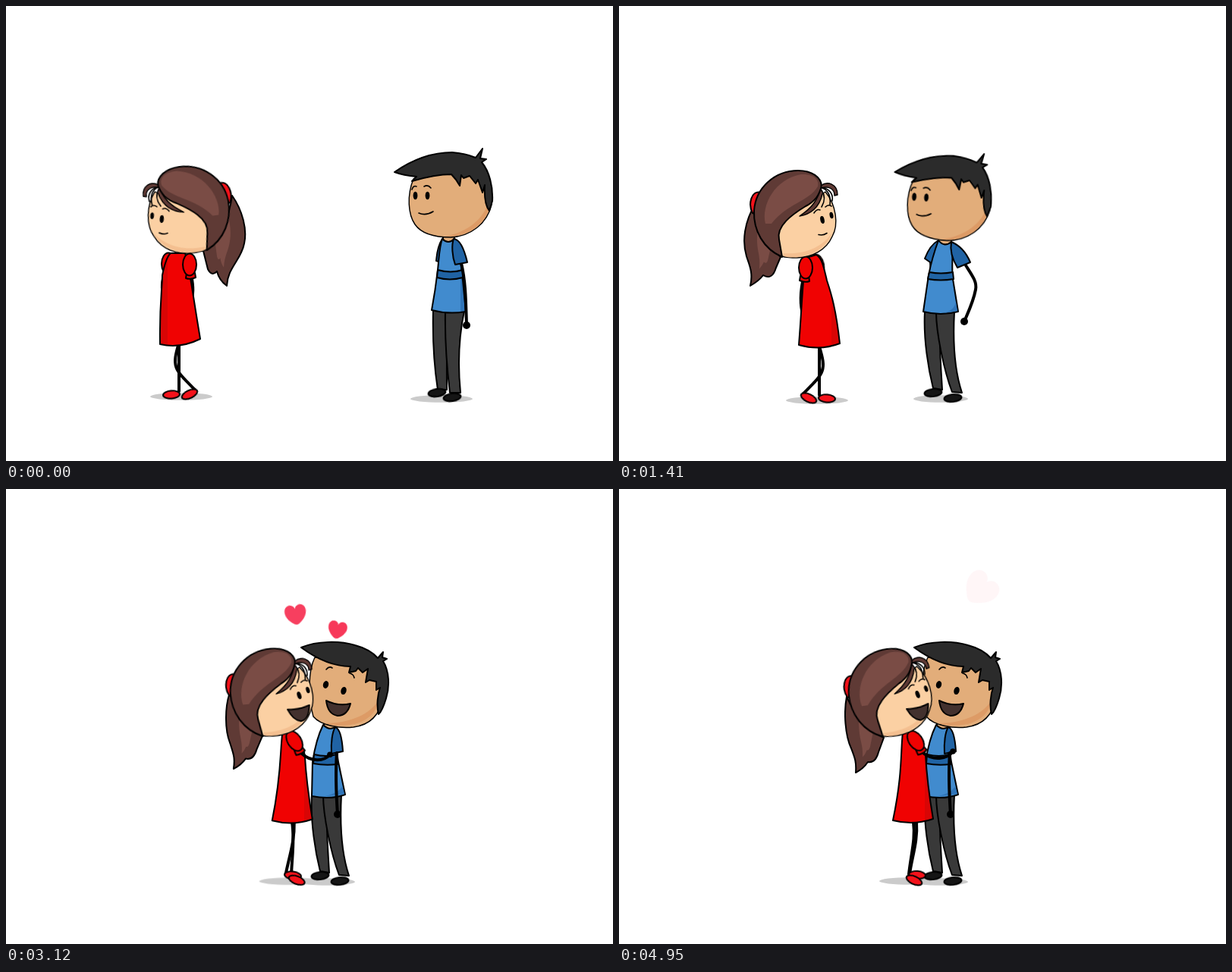
Animation, 800 px wide and 600 px high, one loop 5.31 s. Source, as an HTML page without scripts:

```html
<!DOCTYPE html>
<html lang="en">
<head>
<meta charset="utf-8">
<title>A rose</title>
<style>
html,body{margin:0;width:100%;height:100%;overflow:hidden;background:#fff}
svg{display:block;width:800px;height:600px}
svg *{animation:5.31s linear infinite}
svg .cut{animation-timing-function:step-end}
.ink{stroke:#000;stroke-width:2;stroke-linejoin:round;stroke-linecap:round}
.thin{stroke-width:1.4}
.line{fill:none;stroke:#000;stroke-width:1.6;stroke-linecap:round}
.limb{fill:none;stroke:#000;stroke-width:4;stroke-linecap:round}
.hand{marker-end:url(#hand)}
.small{marker-end:url(#smallHand)}
.shadow{fill:#cbcbcb}
.pants{fill:#393939}
.blue{fill:#418bce}
.navy{fill:#2063a4}
.tan{fill:#e2ad7a}
.hair{fill:#2b2b2b}
.brown{fill:#5f3a35}
.glow{fill:#7a4c45}
.red{fill:#f4121a}
.mouth{fill:#43312e}

/* scene cuts */
.early{animation-name:early}
.mid{animation-name:mid}
.late{animation-name:late}
.single{animation-name:single}
.calmBoy{animation-name:calmBoy}
.gladBoy{animation-name:gladBoy}
.calmGirl{animation-name:calmGirl}
.gladGirl{animation-name:gladGirl}
.back{animation-name:back}
.front{animation-name:front}
@keyframes early{0%{visibility:visible}21%{visibility:hidden}}
@keyframes mid{0%{visibility:hidden}21%{visibility:visible}55.9%{visibility:hidden}}
@keyframes late{0%{visibility:hidden}55.9%{visibility:visible}}
@keyframes single{0%{visibility:visible}55.9%{visibility:hidden}}
@keyframes calmBoy{0%{opacity:1}31%{opacity:0}}
@keyframes gladBoy{0%{opacity:0}31%{opacity:1}}
@keyframes calmGirl{0%{opacity:1}38.9%{opacity:0}}
@keyframes gladGirl{0%{opacity:0}38.9%{opacity:1}}
@keyframes back{0%{visibility:visible}36.7%{visibility:hidden}}
@keyframes front{0%{visibility:hidden}36.7%{visibility:visible}}

/* him */
.walk{animation-name:walk}
@keyframes walk{
0%,4.6%{transform:translateX(0)}
7.91%{transform:translateX(-35px)}
17.51%{transform:translateX(-136px)}
20.34%,100%{transform:translateX(-150px)}}
.bob{animation-name:bob}
@keyframes bob{
0%,4.6%,20.34%,100%{transform:translateY(0)}
7.91%,14.31%{transform:translateY(10px)}
11.3%{transform:translateY(4px)}
17.51%{transform:translateY(9px)}}
.nod{transform-origin:586px 250px;animation-name:nod}
@keyframes nod{
0%,4.6%{transform:translate(0,0) rotate(0)}
7.91%,14.31%{transform:translate(0,10px) rotate(0)}
11.3%{transform:translate(0,4px) rotate(0)}
17.51%{transform:translate(-4px,9.4px) rotate(-2deg)}
20.34%{transform:translate(0,3px) rotate(0)}
24.5%,30.5%,35%,52.5%{transform:translate(-.5px,4.4px) rotate(3.5deg)}
32%{transform:translate(-.5px,-6px) rotate(3.5deg)}
55.9%,100%{transform:translate(18px,8px) rotate(12deg)}}
.blink,.wink{transform-box:fill-box;transform-origin:center}
.blink{animation-name:blink}
@keyframes blink{0%,7.1%,8.9%,100%{transform:scaleY(1)}7.7%,8.2%{transform:scaleY(.22)}}
.wink{animation-name:wink}
@keyframes wink{0%,74%,77%,100%{transform:scaleY(1)}75.2%,75.8%{transform:scaleY(.2)}}
.legL{animation-name:legL}
@keyframes legL{
0%,4.6%{d:path("M563 400C562 440 565 480 569 506L581 506C581 470 580 440 584 402")}
7.91%,14.31%{d:path("M566 410C540 450 543 470 541 509L553 510C554 470 565 445 587 412")}
11.3%,17.51%{d:path("M565 410C536 455 551 465 576 503L588 494C568 470 568 455 586 412")}
20.34%,100%{d:path("M553 403C551 440 558 480 564 504L576 506C574 470 571 440 575 404")}}
.legR{animation-name:legR}
@keyframes legR{
0%,4.6%{d:path("M579 402C578 450 582 485 585 510L599 510C596 480 596 440 604 402")}
7.91%,14.31%{d:path("M581 412C582 475 588 475 615 506L629 504C595 470 593 460 604 412")}
11.3%,17.51%{d:path("M577 412C556 455 564 465 573 508L587 507C564 450 603 445 603 410")}
20.34%,100%{d:path("M568 404C568 430 578 480 589 509L602 510C592 480 590 440 592 403")}}
.footL{animation-name:footL}
@keyframes footL{
0%,4.6%{transform:translate(568px,510px) rotate(-8deg)}
7.91%,14.31%{transform:translate(540px,512px) rotate(4deg)}
11.3%,17.51%{transform:translate(581px,503px) rotate(-48deg)}
20.34%,100%{transform:translate(564px,510px) rotate(-6deg)}}
.footR{animation-name:footR}
@keyframes footR{
0%,4.6%{transform:translate(588px,516px) rotate(-8deg)}
7.91%,14.31%{transform:translate(620px,515px) rotate(-20deg)}
11.3%,17.51%{transform:translate(576px,517px) rotate(-5deg)}
20.34%,100%{transform:translate(590px,517px) rotate(-6deg)}}
.stride{animation-name:stride}
@keyframes stride{0%,4.6%,11.3%,17.51%{rx:41px}7.91%,14.31%{rx:53px}20.34%,100%{rx:36px}}
.swing{animation-name:swing}
@keyframes swing{
0%,4.6%{d:path("M600 339C606 365 606 390 607 421")}
7.91%{d:path("M600 335C597 375 591 395 581 419")}
14.31%{d:path("M600 337C606 365 614 390 626 415")}
17.51%,100%{d:path("M603 339C611 366 611 391 611 420")}}
.offer{animation-name:offer}
@keyframes offer{
0%,21%{d:path("M411 338C405 360 404 385 408 415")}
26.4%,30%{d:path("M411 338C412 365 420 385 436 385")}
35%{d:path("M411 338C402 360 399 370 367 377")}
40%,100%{d:path("M411 338C403 372 402 367 347 365")}}
.rose{animation-name:rose}
@keyframes rose{
0%,30%{transform:translate(428px,372px) rotate(-20deg)}
35%{transform:translate(359px,361px) rotate(-18deg)}
40%,100%{transform:translate(348px,348px) rotate(0)}}

/* her */
.turn{animation-name:turn}
@keyframes turn{0%{transform:translate(492px,-5px) scale(-1,1)}9.42%{transform:none}}
.tilt{transform-origin:232px 275px;animation-name:tilt}
@keyframes tilt{
0%,9.41%{transform:translate(20px,-1px) rotate(8deg)}
9.42%{transform:translate(10px,-2px) rotate(4deg)}
13%,36.7%{transform:translate(0,0) rotate(0)}
42.4%,51.5%{transform:translate(47px,-9px) rotate(19deg)}
59.5%,100%{transform:translate(125px,-6px) rotate(-8deg)}}
.tail{animation-name:tail}
.core{transform-box:fill-box;transform-origin:55% 40%;transform:scale(.36,.66)}
@keyframes tail{
0%,9.41%{d:path("M194 255C180 275 174 300 178 318C182 340 200 350 201 374Q211 367 214 355Q221 362 226 352L232 328Q200 300 194 255")}
9.42%,10.2%,21%,36.7%{d:path("M180 260C165 285 162 310 168 330C172 342 177 352 173 369Q185 362 190 355Q202 362 207 345L213 331Q185 305 180 260")}
14.1%{d:path("M174 245C140 235 112 245 104 265C98 285 110 300 103 318Q115 318 120 312Q138 318 146 308L178 286Q171 268 174 245")}
17.51%{d:path("M174 249C145 245 122 262 118 285C114 308 126 320 115 344Q127 339 133 334Q148 340 153 327L177 285Q171 268 174 249")}
42.4%,51.5%{d:path("M241 221C212 222 190 240 187 265C185 288 194 300 178 319Q188 314 194 311Q208 318 215 304L232 290Q226 255 241 221")}
59.5%,100%{d:path("M300 274C296 295 298 325 306 342C311 355 313 360 312 374Q322 369 328 360Q338 362 342 347L349 328Q318 312 300 274")}}
.dress{animation-name:dress}
@keyframes dress{
0%,9.41%{d:path("M256 331C250 350 246 385 236 444Q262 457 289 451C290 400 286 375 286 360C283 345 280 335 275 331Z")}
9.42%,36.7%{d:path("M250 331C242 345 243 370 237 447Q265 455 291 445C286 400 280 380 274 362C270 345 268 333 260 328Z")}
42.4%,51.5%{d:path("M268 322C260 345 258 370 248 440Q275 449 301 440C297 400 294 380 291 355C290 340 290 330 286 324Z")}
59.5%,100%{d:path("M374 321C371 345 374 375 361 437Q388 444 414 435C408 400 405 370 404 350C400 338 395 325 386 318Z")}}
.puff{animation-name:puff}
@keyframes puff{
0%,9.41%{transform:translate(250px,346px) rotate(0)}
9.42%,36.7%{transform:translate(246px,345px) rotate(0)}
42.4%,51.5%{transform:translate(271px,335px) rotate(-6deg)}
59.5%,100%{transform:translate(391px,332px) rotate(-35deg)}}
.farPuff{animation-name:farPuff}
@keyframes farPuff{
0%,9.41%{transform:translate(278px,345px) rotate(0)}
9.42%,36.7%{transform:translate(261px,342px) rotate(-10deg)}
42.4%,51.5%{transform:translate(290px,337px) rotate(-8deg)}
59.5%,100%{transform:translate(388px,335px) rotate(-35deg)}}
.rest{animation-name:rest}
@keyframes rest{
0%,9.41%{d:path("M247 365C245 378 244 390 254 402")}
9.42%,24%{d:path("M243 363C237 380 239 400 252 414")}
30%,100%{d:path("M241 362C240 385 238 400 236 418")}}
.reach{animation-name:reach}
@keyframes reach{
0%,36.7%{d:path("M241 362C240 385 238 400 236 418")}
42.4%,51.5%{d:path("M273 352C275 375 284 388 296 393")}
59.5%,100%{d:path("M402 349C414 358 432 357 440 346")}}
.far{animation-name:far}
@keyframes far{
0%,9.41%{d:path("M283 358C287 370 289 382 278 400")}
9.42%,36.7%{d:path("M264 352C266 370 262 390 262 400")}
42.4%,51.5%{d:path("M297 352C300 366 306 371 316 373")}
59.5%,100%{d:path("M390 345C392 352 392 356 390 360")}}
.legA{animation-name:legA}
@keyframes legA{
0%,36.7%{d:path("M264 449C264 470 264 490 264 513")}
42.4%,51.5%{d:path("M275 444C270 470 266 490 264 513")}
55%{d:path("M316 442C310 470 304 490 294 508")}
59.5%,100%{d:path("M392 439C394 465 386 485 383 508")}}
.legB{animation-name:legB}
@keyframes legB{
0%,36.7%{d:path("M264 449C274 482 270 484 243 511")}
42.4%,51.5%{d:path("M288 443C306 464 300 470 272 491")}
55%{d:path("M320 442C326 465 336 490 345 510")}
59.5%,100%{d:path("M388 439C391 462 385 480 382 508")}}
.shoeA{animation-name:shoeA}
@keyframes shoeA{
0%,51.5%{transform:translate(274px,517.5px) rotate(4deg)}
55%{transform:translate(300px,513px) rotate(24deg)}
59.5%,100%{transform:translate(393px,509px) rotate(4deg)}}
.shoeB{animation-name:shoeB}
@keyframes shoeB{
0%,36.7%{transform:translate(250px,517px) rotate(25deg)}
42.4%,51.5%{transform:translate(279px,497px) rotate(25deg)}
55%{transform:translate(353px,515px) rotate(0)}
59.5%,100%{transform:translate(389px,516px) rotate(25deg)}}
.drift{animation-name:drift}
@keyframes drift{
0%,36.7%{transform:translate(261px,520px)}
42.4%,51.5%{transform:translate(281px,520px)}
59.5%,100%{transform:translate(384px,517px)}}

/* hearts */
.heart{fill:#f6193f;opacity:0}
.heartL{animation-name:heartL}
@keyframes heartL{
0%,56%,80.3%{opacity:0;transform:translate(402px,205px) rotate(0) scale(.2)}
56.2%,80.5%{opacity:1;transform:translate(402px,205px) rotate(0) scale(.2)}
61%,85.3%{opacity:.7;transform:translate(364px,130px) rotate(-15deg) scale(1)}
66.7%,80.2%,91%,100%{opacity:0;transform:translate(347px,102px) rotate(-25deg) scale(1)}}
.heartR{animation-name:heartR}
@keyframes heartR{
0%,56%,80.3%{opacity:0;transform:translate(420px,205px) rotate(0) scale(.2)}
56.2%,80.5%{opacity:1;transform:translate(420px,205px) rotate(0) scale(.2)}
62%,86.3%{opacity:.7;transform:translate(458px,160px) rotate(25deg) scale(1)}
68.93%,93.22%,100%{opacity:.045;transform:translate(477px,131px) rotate(43deg) scale(1)}
69.6%,80.2%{opacity:0;transform:translate(477px,131px) rotate(43deg) scale(1)}}
</style>
</head>
<body>
<svg viewBox="0 0 800 600">
<defs>
<marker id="hand" markerUnits="userSpaceOnUse" markerWidth="12" markerHeight="12" refX="6" refY="6"><circle cx="6" cy="6" r="5"/></marker>
<marker id="smallHand" markerUnits="userSpaceOnUse" markerWidth="12" markerHeight="12" refX="6" refY="6"><circle cx="6" cy="6" r="3.8"/></marker>
<linearGradient id="cloth"><stop offset=".8" stop-color="#f00202"/><stop offset=".8" stop-color="#d90505"/></linearGradient>
<linearGradient id="shirt"><stop offset=".84" stop-color="#418bce"/><stop offset=".84" stop-color="#2f74b8"/></linearGradient>
<path id="love" d="M-5 21C-32 2-23-21-9-19-3-18 0-13 0-10 0-13 3-18 9-19 23-21 32 2 5 21Q0 24-5 21Z"/>
<g id="sleeve" class="ink" fill="#f00202"><path d="M-7 11L-8 17Q-1 20 5 18L4 11"/><ellipse rx="9" ry="14.5"/></g>
</defs>

<g class="turn cut"><ellipse class="shadow drift" rx="41" ry="4.8"/></g>
<g class="walk"><ellipse class="shadow stride" cx="574" cy="518" rx="41" ry="4.8"/></g>

<g class="walk">
<path class="ink pants legL"/>
<ellipse class="ink footL" rx="11.5" ry="5" fill="#151515"/>
<path class="ink pants legR"/>
<ellipse class="ink footR" rx="11.5" ry="5" fill="#151515"/>
<g class="early cut"><g class="bob">
<path class="ink navy" d="M575 307C568 318 568 328 567 336L573 338Z"/>
<path class="tan ink" d="M576 300V309Q583 314 591 308V300Z"/>
<path class="ink" fill="url(#shirt)" d="M575 307Q583 315 591 307C600 325 600 350 602 362L606 403Q583 407 561 401C564 385 567 365 569 348C571 330 571 318 575 307Z"/>
<path class="ink navy" d="M569 348Q586 353 602 348V358Q585 363 568 358Z"/>
<path class="limb hand swing"/>
<path class="ink navy" d="M590 307C600 308 605 325 608 338L592 341C588 330 587 315 590 307Z"/>
</g></g>
</g>

<g class="mid cut">
<path class="limb hand offer"/>
<g class="rose">
<path fill="#7b8a2c" d="M-7 6L-5 12-1 9 1 13 4 9 8 11 6 5Z"/>
<path fill="#cf1717" d="M-8-5L-3-9 3-7 8-8 7 0 8 4 3 8-4 8-8 4-6 0Z"/>
<path d="M-5-3Q0 2 5-4M-5 3Q1 6 5 2" fill="none" stroke="#970d0d"/>
</g>
<path class="limb hand" d="M457 342C466 356 472 364 470 374C467 390 461 402 455 416"/>
<path class="ink navy" d="M421 309C412 314 406 325 403 333L413 340Z"/>
<path class="tan ink" d="M421 302V311Q429 318 438 312V302Z"/>
<path class="ink blue" d="M421 309Q429 319 438 311C441 330 438 345 440 360L447 403Q424 409 401 403L408 355C411 340 415 325 421 309Z"/>
<path fill="#2f74b8" d="M427 405Q442 402 444 390L446 402Z"/>
<path class="ink navy" d="M409 351Q424 354 440 351L441 360Q424 363 407 360Z"/>
<path class="ink navy" d="M438 311C450 316 458 326 463 338L446 345C440 335 436 322 438 311Z"/>
</g>

<g class="late cut">
<path class="tan ink" d="M419 304V313Q427 319 436 314V304Z"/>
<path class="ink blue" d="M418 311Q427 320 435 313C437 330 435 345 438 360L447 403Q428 410 403 405L404 360C407 340 411 325 418 311Z"/>
<path fill="#2f74b8" d="M415 406Q438 402 443 392L446 402Z"/>
<path class="ink navy" d="M406 350Q422 354 436 350L437 363Q420 365 405 362Z"/>
<path class="ink navy" d="M434 314C440 316 443 330 444 346L429 349C428 335 430 320 434 314Z"/>
<path class="limb hand" d="M436 348C434 375 435 400 437 429"/>
<path class="ink thin tan" d="M407 222C398 240 398 275 405 300C415 312 440 316 458 314C480 311 493 297 497 275L480 225Z"/>
<path fill="#dd9b66" d="M420 309C455 309 480 296 490 280C488 305 455 318 420 309Z"/>
<path class="ink hair" d="M389 209C410 200 440 200 460 206C475 210 484 216 490 223L497 215 496 222 502 224 497 227C505 240 506 260 501 276C498 286 495 294 491 297C488 285 490 270 493 262L488 265V254L479 252 474 255 477 237 470 242 464 236 461 240 452 242 454 234C434 234 412 226 389 209Z"/>
<path class="line" d="M422 238Q426 233 430 236M453 243Q458 244 459 249"/>
<g class="wink"><ellipse cx="421.5" cy="258" rx="3.6" ry="5" transform="rotate(15 421.5 258)"/><ellipse cx="445" cy="266" rx="3.6" ry="5.2" transform="rotate(15 445 266)"/></g>
<path class="ink mouth" d="M422 279Q438 287 454 283Q450 299 437 299Q424 297 422 279Z"/>
</g>

<g class="walk"><g class="single cut"><g class="nod">
<path class="ink thin tan" d="M537 228C528 250 530 275 539 288C548 301 568 305 586 305C612 304 634 287 640 262C644 240 632 205 600 200Z"/>
<path fill="#dd9b66" d="M578 304C610 298 630 280 637 256C640 280 615 306 578 304Z"/>
<path class="ink hair" d="M512 219C535 203 560 193 588 193C602 194 612 197 619 200L628 188 625 201 633 202 627 206C637 218 642 238 641 257L637 270C632 264 630 255 631 236L628 246 622 229 619 234 611 224 603 227 600 223 598 237 593 229 587 222C570 222 552 226 535 231L541 225C530 224 520 222 512 219Z"/>
<path class="line" d="M535 242Q537 236 541 238M551 238Q556 235 560 240"/>
<g class="blink"><ellipse cx="539.5" cy="250" rx="2.9" ry="5.2"/><ellipse cx="555.5" cy="250" rx="2.9" ry="5.2"/></g>
<path class="line calmBoy cut" d="M544 273Q553 277 563 271"/>
<path class="ink mouth gladBoy cut" d="M543 272C555 275 567 270 576 264C577 278 570 288 559 288C550 287 543 282 543 272Z"/>
</g></g></g>

<g class="turn cut">
<path class="ink brown tail"/>
<path class="glow tail core"/>
<path class="limb small far"/>
<g class="farPuff"><use href="#sleeve"/></g>
<path class="limb legA"/>
<path class="limb legB"/>
<ellipse class="ink red shoeA" rx="11" ry="5.2"/>
<ellipse class="ink red shoeB" rx="11" ry="5.2"/>
<g class="back cut"><path class="limb small rest"/></g>
<path class="ink dress" fill="url(#cloth)"/>
<g class="front cut"><path class="limb small reach"/></g>
<g class="puff"><use href="#sleeve"/></g>
<g class="tilt">
<path class="ink red" d="M187 246C174 242 170 262 176 273L184 276Z"/>
<path class="ink thin" fill="#fbd0a3" d="M272 245C286 262 290 288 281 304C273 322 255 331 235 332Q222 332 214 330L205 290Z"/>
<path fill="#f4bf90" d="M217 326C245 328 268 318 281 299C273 324 240 336 217 330Z"/>
<path class="ink brown" d="M215 331C190 320 177 296 178 270C180 240 205 217 236 217C255 217 266 226 267 237C264 250 258 258 246 264C228 275 207 290 211 308Z"/>
<path class="glow" d="M193 287C187 262 206 228 240 222C258 221 264 230 262 238C250 258 222 260 201 287Z"/>
<path class="ink thin brown" d="M266 237C275 230 288 235 288 249L284 250C284 241 276 237 267 240M267 238C262 255 255 266 238 277C252 275 264 266 268 248"/>
<path class="line" d="M268 240Q280 245 278 262M267 243Q274 253 267 265M271 240Q283 245 281 257"/>
<path class="line" d="M257 273Q261 267 265 269M272 265Q276 261 280 264"/>
<g class="wink"><ellipse cx="268" cy="282" rx="2.7" ry="5" transform="rotate(-12 268 282)"/><ellipse cx="280" cy="276" rx="2.4" ry="4.3" transform="rotate(-12 280 276)"/></g>
<path class="line calmGirl cut" d="M263 301.5Q269 303 274 299.5"/>
<path class="ink mouth gladGirl cut" d="M251 299Q266 301 280 296Q278 315 267 316Q257 314 251 299Z"/>
</g>
</g>

<use href="#love" class="heart heartL"/>
<use href="#love" class="heart heartR"/>
</svg>
</body>
</html>
```
